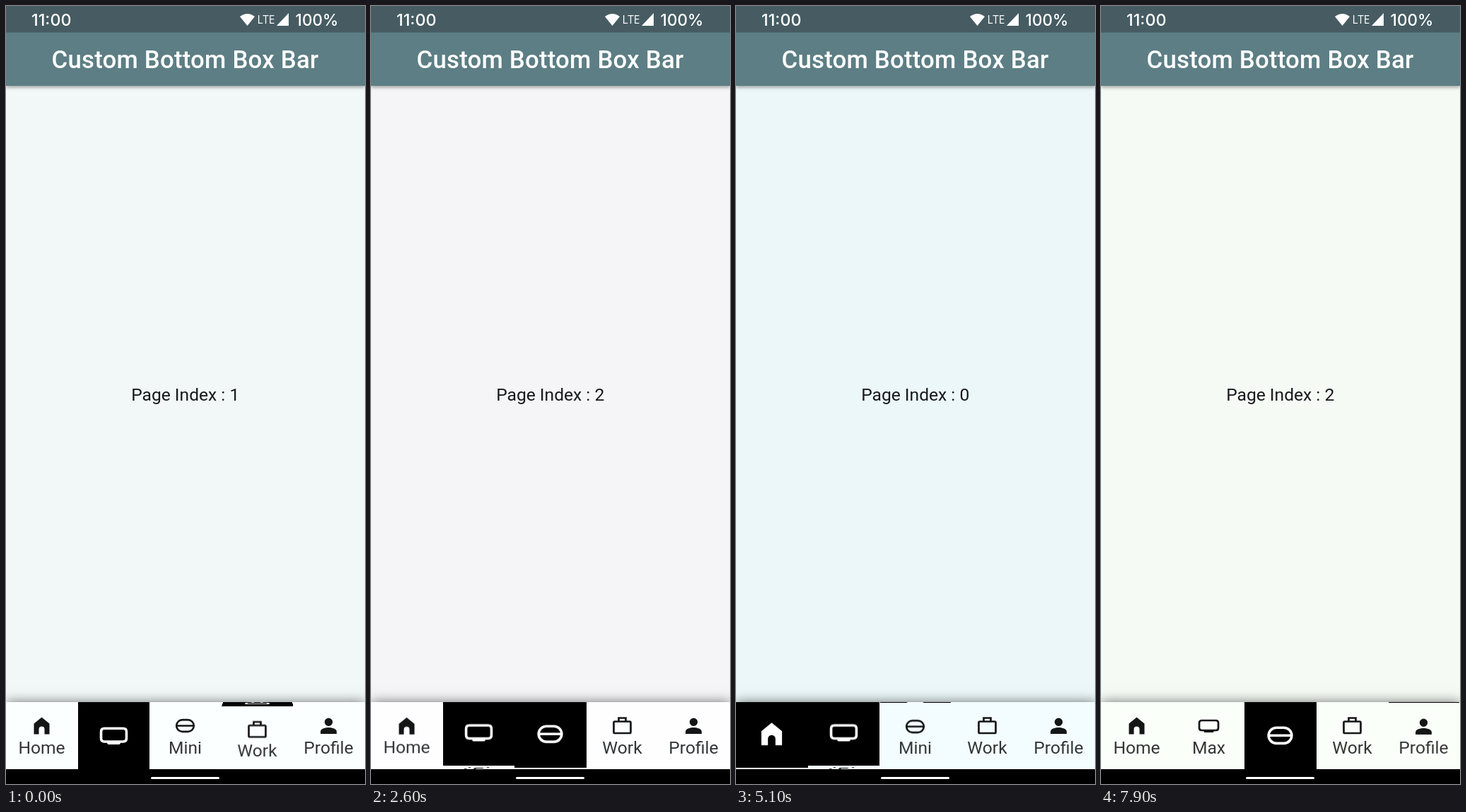
Animation, 508 px wide and 1102 px high, one loop 8 s. Source, as an HTML page:

```html
<!DOCTYPE html>
<html lang="en">
<head>
<meta charset="utf-8">
<title>Box bar</title>
<style>
  html, body { margin: 0; width: 100%; height: 100%; overflow: hidden; }
  #stage { position: relative; width: 508px; height: 1102px; overflow: hidden; background: var(--page); }
  #stage > * { position: absolute; left: 0; }
  svg { display: block; overflow: visible; }
  text { font-family: Roboto, sans-serif; }
  #head { top: 0; width: 508px; height: 113px; background: #5c7e84; box-shadow: 0 2px 5px rgba(0,0,0,.4); }
  #info { top: 0; }
  #bar { top: 986px; width: 508px; height: 95px; background: var(--tab); box-shadow: 0 0 16px rgba(0,0,0,.55); }
  .tab { position: absolute; top: 0; width: 101.6px; height: 95px; overflow: hidden; }
  .face { position: absolute; inset: 0; }
  .front { background: var(--tab); color: #141616; transform-origin: 50% 0; }
  .top { background: #000; color: #fff; transform-origin: 50% 100%; }
  #nav { top: 1081px; width: 508px; height: 21px; background: #000; }
  #nav i { position: absolute; left: 205px; top: 10.5px; width: 97px; height: 3px; border-radius: 2px; background: #fff; }
  #dot { width: 31px; height: 31px; margin: -16px; box-sizing: border-box; border-radius: 50%;
    background: rgba(255,255,255,.4); border: 1px solid rgba(130,130,130,.3); }
</style>
</head>
<body>
<div id="stage">
  <div id="head"></div>
  <svg id="info" width="508" height="600">
    <rect width="508" height="37.5" fill="#465c62"/>
    <g fill="#fff">
      <g style="font-weight:500">
        <text x="36" y="28" font-size="23.3" style="font-family:Inter,sans-serif">11:00</text>
        <text x="409.6" y="28" font-size="22.5" style="font-family:Inter,sans-serif">100%</text>
      </g>
      <text x="355.5" y="25" font-size="15.5" style="font-family:'Open Sans',sans-serif">LTE</text>
      <path d="M341.5 28 L331 15 Q341.5 7 352 15 Z M400 10 V28 H383 Z"/>
      <text x="253.5" y="87.5" font-size="34.8" font-weight="500" letter-spacing=".2" text-anchor="middle">Custom Bottom Box Bar</text>
    </g>
    <text id="label" x="253.7" y="558.5" font-size="24.6" text-anchor="middle" fill="#17191b"></text>
  </svg>
  <div id="bar"></div>
  <div id="nav"><i></i></div>
  <div id="dot"></div>
</div>
<script>
const LOOP = 8000, STEP = 100, W = 101.6, H = 95;
const ON = 210, WAIT = 140, OFF = 600, HOLD = 90;

const line = d => `<path d="${d}" fill="none" stroke="currentColor" stroke-width="2.7"/>`;
const fill = d => `<path d="${d}" fill="currentColor"/>`;
const tabs = [
  ['Home', fill('M0 -12 L11 -3 V12 H4 V5 A4 4 0 0 0 -4 5 V12 H-11 V-3 Z')],
  ['Max', line('M-10 -7.5 H10 Q13.5 -7.5 13.5 -4 V3 Q13.5 6.5 10 6.5 H-10 Q-13.5 6.5 -13.5 3 V-4 Q-13.5 -7.5 -10 -7.5 Z')
    + fill('M-7 6 H7 V8 Q7 9.5 5.5 9.5 H-5.5 Q-7 9.5 -7 8 Z')],
  ['Mini', line('M-4 -8.3 H4 A8.3 8.3 0 0 1 4 8.3 H-4 A8.3 8.3 0 0 1 -4 -8.3 Z M-12 0 H12')],
  ['Work', line('M-10.5 -6 H10.5 Q12 -6 12 -4.5 V9 Q12 10.5 10.5 10.5 H-10.5 Q-12 10.5 -12 9 V-4.5 Q-12 -6 -10.5 -6 Z M-5 -6 V-11 H5 V-6')],
  ['Profile', fill('M0 -11 A5.7 5.7 0 0 1 0 .4 A5.7 5.7 0 0 1 0 -11 Z M-11.4 11.5 V8 C-11.4 4 -4 2.4 0 2.4 S11.4 4 11.4 8 V11.5 Z')]
];

// [time, tab, how long the finger stays]
const taps = [
  [-900, 3], [-505, 1], [300, 2], [650, 3], [1000, 4], [1444, 0, 300],
  [1950, 1], [2450, 2], [2946, 1], [3600, 4], [3918, 3], [4262, 2],
  [4500, 1], [4950, 0], [5533, 1], [5960, 2], [6307, 3], [6548, 4], [7289, 2]
];

// [from, page colour, tab colour]
const tones = [
  [0, '#f2f8f8', '#fcffff'], [900, '#f5f4f7', '#fefdff'],
  [3600, '#ebf7f8', '#f3fdff'], [6000, '#f5faf5', '#fbfffa']
];

const $ = id => document.getElementById(id);
const clamp = x => Math.min(1, Math.max(0, x));

const cubes = tabs.map(([name, icon], i) => {
  const el = document.createElement('div');
  el.className = 'tab';
  el.style.left = i * W + 'px';
  el.innerHTML = `
    <div class="face front"><svg width="${W}" height="${H}">
      <g transform="translate(${W / 2 - .3} 33.5)">${icon}</g>
      <text x="${W / 2 - .3}" y="72.5" font-size="24.6" text-anchor="middle" fill="#333636">${name}</text>
    </svg></div>
    <div class="face top"><svg width="${W}" height="${H}">
      <g transform="translate(${W / 2 - .3} 47.3) scale(1.33)">${icon}</g>
    </svg></div>`;
  $('bar').append(el);
  return el.children;
});

// 0 shows the labelled face, 1 the black one
function turn(tab, t) {
  let v = 0;
  taps.forEach(([at, who], k) => {
    if (who !== tab || at > t) return;
    const end = k + 1 < taps.length ? taps[k + 1][0] : Infinity;
    const on = 1 - (1 - clamp((t - at) / ON)) ** 3;
    const off = (1 - clamp((t - end - WAIT) / OFF)) ** 3;
    v = Math.max(v, on * off);
  });
  return v;
}

function draw(t) {
  const tone = tones.filter(s => s[0] <= t).pop();
  $('stage').style.setProperty('--page', tone[1]);
  $('stage').style.setProperty('--tab', tone[2]);
  $('label').textContent = 'Page Index : ' + taps.filter(s => s[0] <= t).pop()[1];

  cubes.forEach(([front, top], i) => {
    const v = turn(i, t);
    const pose = (y, a) => `translateY(${y}px) perspective(1236px) rotateX(${a}deg)`;
    front.style.transform = pose(v * H, -90 * v);
    top.style.transform = pose((v - 1) * H, 90 * (1 - v));
    front.style.visibility = v < 1 ? 'visible' : 'hidden';
    top.style.visibility = v > 0 ? 'visible' : 'hidden';
  });

  const touch = taps.find(([at, , hold = HOLD]) => t >= at - 70 && t < at + hold);
  const dot = $('dot').style;
  dot.visibility = touch ? 'visible' : 'hidden';
  if (touch) {
    dot.left = (touch[1] + .5) * W + 21 + 'px';
    dot.top = (touch[1] ? 1028 : 1051) + 'px';
  }
}

function frame() {
  draw(Math.floor(performance.now() % LOOP / STEP) * STEP);
  requestAnimationFrame(frame);
}
frame();
</script>
</body>
</html>
```
